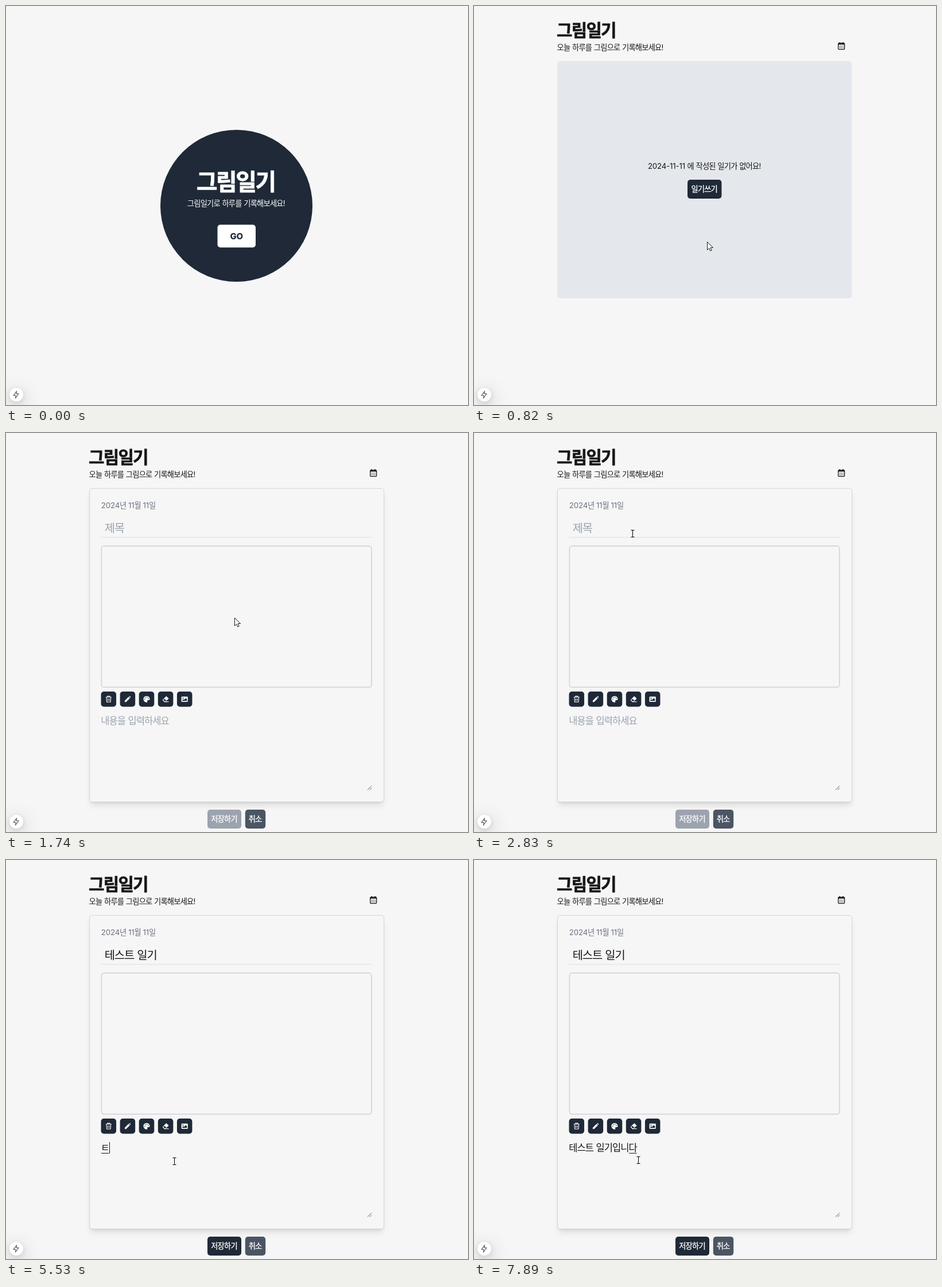
These frames come from a looping animation (805 by 696 pixels, 7990 ms). An HTML page:

```html
<!DOCTYPE html>
<html lang="ko">
<head>
<meta charset="utf-8">
<title>그림일기</title>
<style>
  html, body { margin: 0; width: 100%; height: 100%; overflow: hidden; background: #f6f6f6; }
  #stage { position: absolute; left: 0; top: 0; width: 805px; height: 696px; overflow: hidden; }
  #stage > * { position: absolute; box-sizing: border-box; }
  svg { left: 0; top: 0; }
  #card {
    left: 145px; top: 96px; width: 513.5px; height: 547.5px;
    border: 1px solid #d1d5db; border-radius: 5px; background: #f6f6f6;
    box-shadow: 0 8px 12px -2.5px rgba(0,0,0,.1), 0 3px 5px -3px rgba(0,0,0,.1);
  }
  #badge {
    left: 5.5px; top: 665.8px; width: 24px; height: 24px; border-radius: 50%; background: #fff;
    box-shadow: 0 9px 33px rgba(0,0,0,.25), 0 2px 8px rgba(0,0,0,.12);
  }
  text {
    font-family: Inter, "Noto Sans CJK KR", sans-serif; font-size: 13.25px; fill: #171717;
    white-space: pre; letter-spacing: -.012em;
  }
  .ko { letter-spacing: -.059em; }
  .mid { text-anchor: middle; }
  .title { font-weight: 700; stroke: #171717; stroke-width: .02em; }
  .white { fill: #fff; stroke: #fff; }
  .btn { fill: #fff; stroke: #fff; stroke-width: .3px; }
  .muted { fill: #6b7280; }
  .hint { fill: #9ca3af; }
  .big { font-size: 19.87px; }
  .body { font-size: 16.56px; }
</style>
</head>
<body>
<div id="stage">
  <div id="card"></div>
  <div id="badge"></div>
  <svg width="805" height="696" viewBox="0 0 805 696">
    <path d="M18.6 671.8 13 679.4H17L16.4 684.2 22 676.4H18Z" fill="none" stroke="#666" stroke-width="1.2" stroke-linejoin="round"/>

    <g id="intro">
      <circle cx="401.5" cy="348.5" r="132.5" fill="#1f2937"/>
      <text class="title white mid" x="401.5" y="321" style="font-size:39.7px">그림일기</text>
      <text class="mid" x="401.5" y="349.3" style="fill:#fff">그림일기로 하루를 기록해보세요!</text>
      <rect x="368.5" y="381.5" width="66.5" height="39.7" rx="5" fill="#fff"/>
      <text class="mid" x="401.6" y="406.5" style="font-size:14.9px;font-weight:800;fill:#1f2937">GO</text>
    </g>

    <g id="header">
      <text class="title" x="145" y="53" style="font-size:29.8px">그림일기</text>
      <text x="145" y="76.9">오늘 하루를 그림으로 기록해보세요!</text>
      <g fill="none" stroke="#111">
        <rect x="634.7" y="64.9" width="10.9" height="10.7" rx="1" stroke-width="1.3"/>
        <path d="M634.5 66.3H646" stroke-width="2"/>
        <path d="M637.3 63V66M643 63V66" stroke-width="1.5"/>
        <path d="M636.9 70.2H644M636.9 72.8H644" stroke-width="1.2" stroke-dasharray="1.3 1.4"/>
      </g>
    </g>

    <g id="empty">
      <rect x="145" y="96" width="513.3" height="414" rx="5" fill="#e4e7ec"/>
      <text class="mid" x="401.5" y="284">2024-11-11 에 작성된 일기가 없어요!</text>
      <rect x="372" y="303" width="59.4" height="33" rx="5" fill="#1f2937"/>
      <text class="btn mid" x="401.6" y="323.8">일기쓰기</text>
    </g>

    <g id="form">
      <text class="muted" x="165.8" y="130.8">2024년 11월 11일</text>
      <path d="M165.5 182H637.5" stroke="#d9dce1"/>
      <rect x="166.4" y="197.2" width="470.5" height="246.2" rx="4.5" fill="none" stroke="#d1d5db" stroke-width="1.66"/>
      <g id="tools"></g>
      <path d="M630 622.5 637 615.5M634 622.5 637 619.5" stroke="#555"/>
      <rect id="save" x="351" y="657" width="59" height="33" rx="5"/>
      <text class="btn mid" x="380.4" y="678.3">저장하기</text>
      <rect x="416.8" y="657" width="35.4" height="33" rx="5" fill="#4b5563"/>
      <text class="btn mid" x="434.5" y="678.3">취소</text>
      <g id="fields"></g>
    </g>
    <path id="cursor" stroke="#000" stroke-linejoin="round"/>
  </svg>
</div>

<script>
const LOOP = 7990;
const $ = id => document.getElementById(id);

// Hangul runs are set tighter than digits; dx balances their side bearings
const hangul = /[\u3131-\uD7A3]+/g;
const setText = (node, s) => {
  node.innerHTML = s.replace(hangul, '<tspan class="ko">$&</tspan>');
  if (s.search(hangul) === 0) node.setAttribute('dx', '-.03em');
};
document.querySelectorAll('text').forEach(n => setText(n, n.textContent));

const advance = (s, size) =>
  [...s].reduce((w, c) => w + (c === ' ' ? .27 : .861), 0) * size;

const icons = [
  '<path d="M-5-3.5H5M-2-3.5V-5.2H2V-3.5M-3.8-3.5-3.3 5H3.3L3.8-3.5M-1.3-1V3M1.3-1V3" fill="none" stroke="#fff" stroke-width="1.1"/>',
  '<path d="M-5 5V2.6L1.6-4 4 -1.6-2.6 5ZM2.4-4.7 3.2-5.3Q4-5.6 4.7-4.9T5.2-3.2L4.7-2.4Z" fill="#fff"/>',
  '<path d="M0-5.6A5.6 5.6 0 1 0 0 5.6Q2 5.4 1.2 3.6T2.4 1.7H4Q5.6 1.6 5.6 0A5.6 5.6 0 0 0 0-5.6Z" fill="#fff"/><path d="M-3.3.2h.1M-2.2-2.6h.1M.6-3.3h.1M3.1-1.5h.1" stroke="#1f2937" stroke-width="1.6" stroke-linecap="round"/>',
  '<path d="M-5.5 1.5 1.2-5.2 5.5-1-.8 5H-2.3Z" fill="#fff"/><path d="M-2.6-.6-4 1.3-1.7 3.6H-.8L1.4 1.9Z" fill="#1f2937"/><path d="M-2 4.5H5.5" stroke="#fff" stroke-width="1.1"/>',
  '<rect x="-5.6" y="-4.6" width="11.2" height="9.2" rx="1.2" fill="#fff"/><circle cx="-2.8" cy="-1.8" r="1.1" fill="#1f2937"/><path d="M-4 3V1.7L-2.3.2-1 1.3 2-1.8 4.2.5V3Z" fill="#1f2937"/>'
];
$('tools').innerHTML = icons.map((icon, i) =>
  `<g transform="translate(${178.8 + 33.1 * i} 464.3)">
    <rect x="-13.25" y="-13.25" width="26.5" height="26.5" rx="5" fill="#1f2937"/>${icon}</g>`).join('');

const shapes = {
  arrow: ['M0 0V14L3.3 10.9 5.3 15.6 7.6 14.6 5.6 10H10Z', '#fff', .9],
  hand: ['M-1.5 12V1.5a1.5 1.5 0 0 1 3 0V7q0-1.2 1.3-1.2t1.4 1.4q.2-.9 1.3-.9t1.3 1.5q.3-.7 1.1-.7t1.1 1.2V13q0 3-2 6H1q-1-2-3.5-5l-3.5-4q-.8-1.3.3-1.9t2 .3l2.2 2ZM1.8 12.5v3.5M4 12.5v3.5M6.2 12.5v3.5', '#fff', .9],
  beam: ['M-3-6H3M0-6V6M-3 6H3', 'none', 1]
};

const pointer = [
  [0, -50, -50, 'arrow'],
  [200, 752, 671, 'arrow'], [300, 640, 575, 'arrow'], [400, 510, 480, 'arrow'],
  [520, 430, 424, 'arrow'], [620, 408, 411, 'hand'], [820, 406.5, 411.5, 'arrow'],
  [1120, 405, 396, 'arrow'], [1220, 402, 355, 'arrow'], [1320, 396, 325, 'hand'],
  [1420, 394.5, 313.5, 'hand'], [1520, 399.3, 323.3, 'hand'], [1740, 398.5, 322.5, 'arrow'],
  [1840, 388, 302, 'arrow'], [1940, 352, 250, 'arrow'], [2040, 314, 203, 'arrow'],
  [2140, 290, 180, 'beam'], [2240, 279, 176.5, 'beam'], [2340, 276.5, 175.5, 'beam'],
  [4710, 300, 250, 'arrow'], [4810, 390, 520, 'beam'], [4910, 435.5, 659.5, 'hand'],
  [5020, 385, 595, 'beam'], [5130, 312, 541, 'beam'], [5230, 293.5, 525.5, 'beam'],
  [7890, 286.5, 523.5, 'beam']
];

// Rows: time, text, caret shown, last syllable being composed
const key = (t, s) => [t, s, 1, !s.endsWith(' ')];
const titleSteps = [
  [0, '', 0, 0], [2340, '', 1, 0], [2830, '', 0, 0],
  key(3030, 'ㅌ'), key(3130, '테'), key(3230, '텟'), key(3340, '테스'),
  key(3440, '테슽'), key(3540, '테스트'), key(3650, '테스트 '), key(3750, '테스트 ㅇ'),
  key(3860, '테스트 이'), key(4080, '테스트 일'), key(4180, '테스트 일기'),
  [4710, '테스트 일기', 0, 1], [5230, '테스트 일기', 0, 0]
];
const bodySteps = [
  [0, '', 0, 0], [5230, '', 1, 0],
  key(5530, 'ㅌ'), key(5730, '테'), key(5840, '테스'), key(5950, '테슽'), key(6050, '테스트'),
  key(6250, '테스트 '), key(6350, '테스트 ㅇ'), key(6450, '테스트 이'), key(6550, '테스트 일'),
  key(6650, '테스트 읽'), key(6750, '테스트 일기'), key(6850, '테스트 일깅'),
  key(6950, '테스트 일기이'), key(7070, '테스트 일기입니'), key(7270, '테스트 일기입니다'),
  [7770, '테스트 일기입니다', 0, 1]
];

const at = (rows, t) => rows.findLast(row => row[0] <= t);
const show = (id, on) => { $(id).style.display = on ? '' : 'none'; };

function makeField(steps, hint, cls, size, x, baseline, top, bottom) {
  const g = document.createElementNS('http://www.w3.org/2000/svg', 'g');
  g.innerHTML = `<text class="${cls}" x="${x}" y="${baseline}"></text><path stroke="#171717"/>`;
  $('fields').append(g);
  const [label, marks] = g.children;
  let shown;
  return t => {
    const step = at(steps, t);
    if (step === shown) return;
    shown = step;
    const [, s, caret, composing] = step;
    setText(label, s || hint);
    label.classList.toggle('hint', !s);
    const end = x + advance(s, size), start = x + advance(s.slice(0, -1), size);
    const caretX = Math.floor(end) + .5;
    marks.setAttribute('d',
      (caret ? `M${caretX} ${top}V${bottom}` : 'M0 0') +
      (composing ? `M${start} ${bottom - .5}H${end - .8}` : ''));
  };
}

const drawTitle = makeField(titleSteps, '제목', 'big', 19.87, 172.3, 173, 154, 178);
const drawBody = makeField(bodySteps, '내용을 입력하세요', 'body', 16.56, 165.8, 508.2, 492, 512);

function draw(t) {
  show('intro', t < 820);
  show('header', t >= 820);
  show('empty', t >= 820 && t < 1740);
  show('form', t >= 1740);
  show('card', t >= 1740);
  $('save').setAttribute('fill', t < 5530 ? '#9ca3af' : '#1f2937');
  drawTitle(t);
  drawBody(t);

  const [, x, y, kind] = at(pointer, t);
  const [d, fill, width] = shapes[kind];
  const cursor = $('cursor');
  cursor.setAttribute('d', d);
  cursor.setAttribute('fill', fill);
  cursor.setAttribute('stroke-width', width);
  cursor.setAttribute('transform', `translate(${x} ${y})`);
}

const start = performance.now();
function tick() {
  draw((performance.now() - start) % LOOP);
  requestAnimationFrame(tick);
}
tick();
</script>
</body>
</html>
```
